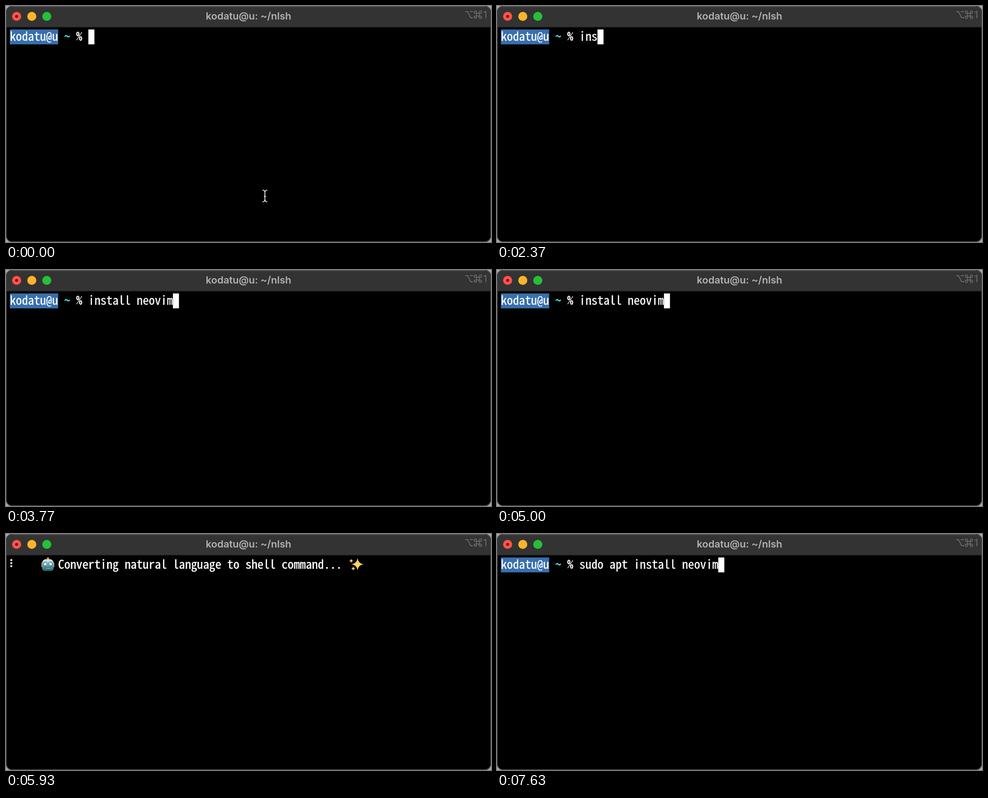
An HTML page with a canvas for the animation above (8 s loop, 1072 by 523 pixels).

```html
<!DOCTYPE html>
<html lang="en">
<head>
<meta charset="utf-8">
<title>Terminal</title>
<style>
  html, body { margin: 0; width: 100%; height: 100%; overflow: hidden; background: #000; }
  canvas { display: block; width: 1072px; height: 523px; }
</style>
</head>
<body>
<canvas id="stage" width="1072" height="523"></canvas>
<script>
const ctx = document.getElementById('stage').getContext('2d');
const W = 1072, H = 523, LOOP = 8000;
const CELL = 13.35, LEFT = 8.5, BASE = 77;
const ROW_TOP = 52, ROW_H = 33;
const MONO = '"Noto Sans Mono CJK JP", "Noto Sans Mono CJK SC", "Noto Sans Mono", monospace';
const UI = 'Inter, "Open Sans", sans-serif';

const USER = 'kodatu@u';
const TYPED = 'install neovim';
const KEYS = [1970, 2170, 2370, 2570, 2630, 2800, 2930, 3030, 3170, 3300, 3430, 3600, 3630, 3770];
const ANSWER = 'sudo apt install neovim';
const STATUS = 'Converting natural language to shell command...';
const SPINNER = '⠋⠙⠹⠸⠼⠴⠦⠧⠇⠏';
const SPIN_START = 5020, SPIN_STEP = 102.5, SPIN_END = 7470;
const POINTER_FADE = [1700, 2100];

// Pick the size whose advance equals one cell, never above the half-em size.
ctx.font = `100px ${MONO}`;
const monoSize = Math.min(26.7, CELL * 100 / ctx.measureText('0').width);

const cellX = col => LEFT + col * CELL;

function rect(x, y, w, h, color) {
  ctx.fillStyle = color;
  ctx.fillRect(x, y, w, h);
}

function disc(x, y, r, color) {
  ctx.fillStyle = color;
  ctx.beginPath();
  ctx.arc(x, y, r, 0, 7);
  ctx.fill();
}

function box(x, y, w, h, r, color) {
  ctx.fillStyle = color;
  ctx.beginPath();
  ctx.roundRect(x, y, w, h, r);
  ctx.fill();
}

function line(points, color, width) {
  ctx.strokeStyle = color;
  ctx.lineWidth = width;
  ctx.beginPath();
  points.forEach(([x, y]) => ctx.lineTo(x, y));
  ctx.stroke();
}

// Monospaced text on the terminal grid, thickened slightly by `extra`.
function write(text, col, color = '#fff', weight = 400, extra = 0.35) {
  ctx.font = `${weight} ${monoSize}px ${MONO}`;
  ctx.textAlign = 'center';
  ctx.fillStyle = ctx.strokeStyle = color;
  ctx.lineWidth = extra;
  [...text].forEach((ch, i) => {
    const x = cellX(col + i + 0.5);
    ctx.fillText(ch, x, BASE);
    if (extra) ctx.strokeText(ch, x, BASE);
  });
}

function drawShortcut() {
  const color = '#6c6c6c';
  line([[1015, 12.5], [1020, 12.5], [1027, 26], [1032, 26]], color, 1.8);
  line([[1025, 12.5], [1032, 12.5]], color, 1.8);
  const cx = 1043, cy = 19.3, a = 3, r = 2.6;
  ctx.lineWidth = 1.7;
  ctx.strokeRect(cx - a, cy - a, 2 * a, 2 * a);
  for (let q = 0; q < 4; q++) {
    ctx.save();
    ctx.translate(cx, cy);
    ctx.rotate(q * Math.PI / 2);
    ctx.beginPath();
    ctx.arc(a + r, a + r, r, Math.PI, Math.PI * 1.5, true);
    ctx.lineTo(a, a);
    ctx.closePath();
    ctx.stroke();
    ctx.restore();
  }
  ctx.font = `400 21px ${UI}`;
  ctx.textAlign = 'right';
  ctx.fillStyle = color;
  ctx.fillText('1', 1063.5, 27);
}

function drawWindow() {
  rect(0, 0, W, H, '#a9a9a9');
  box(0, 0, W, H, 13, '#000');
  box(0, 0, W, 46, [13, 13, 0, 0], '#333');
  rect(0, 46, W, 1.5, '#222');
  ctx.strokeStyle = '#484848';
  ctx.lineWidth = 1.5;
  ctx.beginPath();
  ctx.roundRect(1, 1, W - 2, H - 2, 12);
  ctx.stroke();
  rect(13, 0.5, W - 26, 1, '#686868');

  disc(23.5, 23, 10, '#ff544d');
  disc(23.5, 23, 3.3, '#8a0905');
  disc(57, 23, 10, '#ffb429');
  disc(90.2, 23, 10, '#25c138');

  ctx.font = `600 22px ${UI}`;
  ctx.textAlign = 'center';
  ctx.fillStyle = '#b2b2b2';
  ctx.fillText(`${USER}: ~/nlsh`, 536, 30);
  drawShortcut();
}

function drawPrompt(input) {
  rect(LEFT, ROW_TOP, CELL * USER.length, ROW_H, '#386fac');
  write(USER, 0);
  write('~', 9, '#35dde0', 700, 0);
  write('%', 11, '#fff', 700, 0);
  write(input, 13);
  rect(cellX(13 + input.length), ROW_TOP, CELL, ROW_H, '#fff');
}

function drawPointer(alpha) {
  ctx.globalAlpha = alpha;
  ctx.strokeStyle = '#fff';
  ctx.lineWidth = 1.7;
  ctx.beginPath();
  for (const [end, mid] of [[408, 413], [434, 429]]) {
    ctx.moveTo(567, end);
    ctx.quadraticCurveTo(572, end, 572.3, mid);
    ctx.quadraticCurveTo(572.6, end, 577.5, end);
  }
  ctx.moveTo(572.3, 412);
  ctx.lineTo(572.3, 430);
  ctx.moveTo(570, 422);
  ctx.lineTo(574.6, 422);
  ctx.stroke();
  ctx.globalAlpha = 1;
}

function drawRobot() {
  box(90, 52, 5.5, 5, 1.5, '#f58a3c');
  box(78, 63, 4, 11, 2, '#d9693a');
  box(103, 63, 4, 11, 2, '#d9693a');
  const skin = ctx.createLinearGradient(0, 56, 0, 82);
  skin.addColorStop(0, '#dce5e8');
  skin.addColorStop(0.35, '#a9c3cb');
  skin.addColorStop(0.6, '#4b98a3');
  skin.addColorStop(1, '#276d79');
  box(80, 56, 25, 25.5, [8, 8, 5, 5], skin);
  for (const x of [86.7, 98.5]) {
    disc(x, 66.5, 4.7, '#234d58');
    disc(x, 66.5, 3.7, '#8df0f2');
    disc(x, 66.5, 1.7, '#effeff');
  }
  box(91.4, 69.5, 2.6, 3, 1, '#d97a50');
  box(85.5, 74, 14, 4, 2, '#23424a');
  for (let x = 87.5; x < 98; x += 3) rect(x, 75, 2, 2, '#d8eef0');
}

function drawStar(x, y, r) {
  ctx.fillStyle = '#ffd264';
  ctx.beginPath();
  ctx.moveTo(x, y - r);
  for (let q = 0; q < 4; q++) {
    const a = q * Math.PI / 2, b = a + Math.PI / 4, k = r * 0.16;
    ctx.quadraticCurveTo(x + k * Math.sin(b), y - k * Math.cos(b),
      x + r * Math.cos(a), y + r * Math.sin(a));
  }
  ctx.fill();
}

function drawSpinner(step) {
  const bits = SPINNER.charCodeAt(step % SPINNER.length) - 0x2800;
  for (let i = 0; i < 6; i++) {
    if (bits >> i & 1) disc(11.7 + 6.7 * (i > 2), 57.8 + 6.7 * (i % 3), 2.2, '#fff');
  }
}

function drawStatus(t) {
  drawSpinner(Math.floor((t - SPIN_START) / SPIN_STEP));
  drawRobot();
  write(STATUS, 8, '#fff', 400, 0.55);
  drawStar(777, 67, 13.5);
  drawStar(763, 59.5, 5);
  drawStar(767.5, 76.5, 5);
}

function render(t) {
  drawWindow();
  if (t < SPIN_START) drawPrompt(TYPED.slice(0, KEYS.filter(k => k <= t).length));
  else if (t < SPIN_END) drawStatus(t);
  else drawPrompt(ANSWER);

  const [from, to] = POINTER_FADE;
  if (t < to) drawPointer(Math.min(1, (to - t) / (to - from)));
}

const start = performance.now();
function tick() {
  render((performance.now() - start) % LOOP);
  requestAnimationFrame(tick);
}
tick();
</script>
</body>
</html>
```
